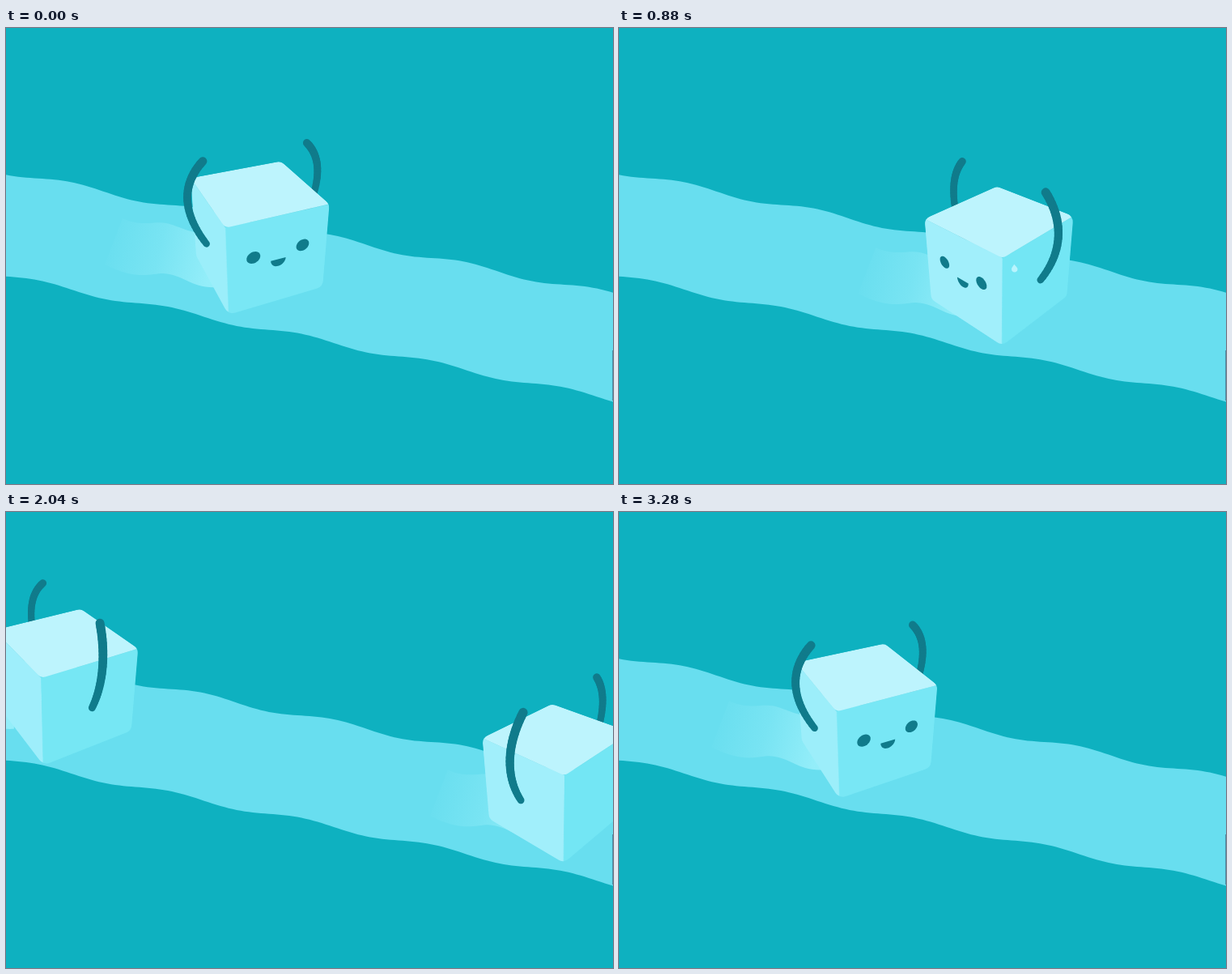
An HTML page with a canvas for the animation above (3.32 s loop, 750x563 px).

```html
<!DOCTYPE html>
<html lang="en">
<head>
<meta charset="utf-8">
<title>Ice cube ride</title>
<style>
  html, body { margin: 0; width: 100%; height: 100%; overflow: hidden; background: #0eb1c0; }
  canvas { display: block; }
</style>
</head>
<body>
<canvas id="stage" width="750" height="563"></canvas>
<script>
const ctx = document.getElementById('stage').getContext('2d');
const LOOP = 3320, STEP = 40, RAD = Math.PI / 180;
const DIST = 600, SIN = 0.474, COS = 0.8805;
const RADIUS = 92, HEIGHT = 123.5, HALF = 65;
const BG = '#0eb1c0', RIVER = '#68deef', INK = '#107b8b', TOP = '#bdf4fd';

const clamp = (v, a = 0, b = 1) => Math.min(b, Math.max(a, v));

// Perspective view from above; z points at the viewer, y up.
function project(c, x, y, z) {
  const k = 1 / (1 - (z * COS + y * SIN) / DIST);
  return { x: c.x + x * k, y: c.y + (z * SIN - y * COS) * k, k };
}

// A point "out" along a direction and "side" to its right.
function polar(c, angle, out, side, y) {
  const s = Math.sin(angle * RAD), o = Math.cos(angle * RAD);
  return project(c, out * s + side * o, y, out * o - side * s);
}

function tracePoly(pts) {
  ctx.beginPath();
  pts.forEach(p => ctx.lineTo(p.x, p.y));
  ctx.closePath();
}

function traceRounded(pts, radius) {
  const n = pts.length, last = pts[n - 1];
  ctx.beginPath();
  ctx.moveTo((last.x + pts[0].x) / 2, (last.y + pts[0].y) / 2);
  pts.forEach((p, i) => {
    const q = pts[(i + 1) % n];
    ctx.arcTo(p.x, p.y, (p.x + q.x) / 2, (p.y + q.y) / 2, radius(p));
  });
  ctx.closePath();
}

const cross = (a, b, c) => (b.x - a.x) * (c.y - a.y) - (b.y - a.y) * (c.x - a.x);

function hull(points) {
  const sorted = [...points].sort((a, b) => a.x - b.x || a.y - b.y);
  const chain = list => {
    const out = [];
    for (const p of list) {
      while (out.length > 1 && cross(out[out.length - 2], out[out.length - 1], p) <= 0) out.pop();
      out.push(p);
    }
    return out.slice(0, -1);
  };
  return [...chain(sorted), ...chain(sorted.reverse())];
}

// Sides are lightest facing front-left and darkest facing front-right.
function shade(angle) {
  const w = (1 + Math.sin(2 * angle * RAD)) / 2;
  const mix = (a, b) => Math.round(a + (b - a) * w);
  return `rgb(${mix(161, 115)},${mix(239, 230)},${mix(251, 244)})`;
}

function drawRiver() {
  const wave = 2 * Math.PI / 162;
  const upper = x => 177.6 + 0.2022 * x + 3.6 * Math.cos(wave * x);
  const lower = x => 306.6 + 0.2035 * x + 3.3 * Math.cos(wave * (x - 122));
  ctx.beginPath();
  for (let x = 0; x <= 750; x += 5) ctx.lineTo(x, upper(x));
  for (let x = 750; x >= 0; x -= 5) ctx.lineTo(x, lower(x));
  ctx.fillStyle = RIVER;
  ctx.fill();
  ctx.fillStyle = '#4a93ac';
  ctx.fillRect(749, 398, 1, 62);
}

function drawWake(t) {
  ctx.save();
  ctx.translate(0.197 * t, 0.0408 * t);
  const g = ctx.createLinearGradient(122, 264, 254, 296);
  g.addColorStop(0, 'rgba(160,242,252,0)');
  g.addColorStop(0.5, 'rgba(160,242,252,.29)');
  g.addColorStop(1, 'rgba(160,242,252,.78)');
  ctx.fillStyle = g;
  ctx.beginPath();
  ctx.moveTo(144, 235);
  ctx.bezierCurveTo(166, 246, 184, 238, 198, 241);
  ctx.bezierCurveTo(216, 245, 228, 255, 262, 256);
  ctx.lineTo(262, 320);
  ctx.bezierCurveTo(228, 322, 222, 305, 194, 303);
  ctx.bezierCurveTo(178, 303, 162, 312, 122, 292);
  ctx.fill();
  ctx.restore();
}

function drawArm(c, angle, side, t) {
  // Quadratic arc in space: shoulder, elbow, hand; the hand drifts backward.
  const bez = (s, a, b, d) => (1 - s) ** 2 * a + 2 * s * (1 - s) * b + s * s * d;
  const handFwd = 1.2 - 0.0047 * t, handY = 52.5 + 0.0027 * t;
  const at = s => {
    const y = bez(s, -61, 11, handY);
    const p = polar(c, angle, bez(s, 68, 107, 67), side * bez(s, 0, -6, handFwd), y);
    p.w = (9.1 + 0.012 * y) * p.k;
    return p;
  };
  ctx.strokeStyle = INK;
  ctx.lineCap = 'round';
  let a = at(0);
  for (let i = 1; i <= 24; i++) {
    const b = at(i / 24);
    ctx.lineWidth = b.w;
    ctx.beginPath();
    ctx.moveTo(a.x, a.y);
    ctx.lineTo(b.x, b.y);
    ctx.stroke();
    a = b;
  }
}

function drawFace(c, theta, t) {
  const spot = (u, y) => polar(c, theta, HALF, u, y);
  const open = clamp(Math.abs(t - 560) / 120, 0.11, 1);
  ctx.fillStyle = INK;
  for (const u of [-32, 32]) {
    const eye = [];
    for (let a = 0; a < 360; a += 12) {
      eye.push(spot(u + 8.6 * Math.cos(a * RAD), -49 + 8.2 * open * Math.sin(a * RAD)));
    }
    tracePoly(eye);
    ctx.fill();
  }
  const mouth = [];
  for (let a = 0; a <= 180; a += 10) {
    mouth.push(spot(9.8 * Math.cos(a * RAD), -60.5 - 10 * Math.sin(a * RAD)));
  }
  tracePoly(mouth);
  ctx.fill();
}

function drawDrop(c, theta, t) {
  if (t < 800 || t > 1560) return;
  const p = (t - 800) / 600;
  const size = Math.min(clamp(0.3 + (t - 800) / 400), clamp((1560 - t) / 140));
  const at = polar(c, theta + 90, HALF, -45, -18 - 106 * Math.min(p, 1) ** 1.5);
  ctx.save();
  ctx.translate(at.x, at.y);
  ctx.scale(size, size);
  ctx.fillStyle = p < 0.5 ? '#b9f4fd' : '#a5f1fc';
  ctx.beginPath();
  ctx.moveTo(-1, -10);
  ctx.bezierCurveTo(2, -6, 7.5, -2, 7.5, 2);
  ctx.bezierCurveTo(7.5, 12, -7.5, 12, -7.5, 2);
  ctx.bezierCurveTo(-7.5, -2, -3, -6, -1, -10);
  ctx.fill();
  ctx.restore();
}

function drawCube(t) {
  const early = Math.max(0, -560 - t);
  const c = {
    x: 309.6 + 0.1822 * t - 1e-5 * early * early,
    y: 202.5 + 0.0357 * t - 2 * Math.exp(-((t / 400) ** 2))
  };
  if (c.x < -130 || c.x > 960) return;
  const theta = 23.4 - 0.0753 * t;
  const corners = y => [-45, 45, 135, 225].map(a => polar(c, theta + a, RADIUS, 0, y));
  const top = corners(0), base = corners(-HEIGHT);
  const outline = hull([...top, ...base]);
  const arms = [-1, 1].map(side => ({ side, angle: theta + 90 * side }));
  const near = arm => Math.cos(arm.angle * RAD) > 0;
  const paintArm = arm => drawArm(c, arm.angle, -arm.side, t);

  drawWake(t);
  arms.filter(a => !near(a)).forEach(paintArm);

  ctx.save();
  traceRounded(outline, () => 11);
  ctx.clip();
  for (let i = 0; i < 4; i++) {
    const j = (i + 1) % 4;
    const side = [top[i], top[j], base[j], base[i]];
    if (cross(side[0], side[1], side[2]) <= 0) continue;
    tracePoly(side);
    ctx.fillStyle = ctx.strokeStyle = shade(theta + 90 * i);
    ctx.lineWidth = 0.6;
    ctx.fill();
    ctx.stroke();
    if (i === 0) drawFace(c, theta, t);
  }
  // Outer corners are already rounded by the clip.
  traceRounded(top, p => outline.includes(p) ? 1 : 9);
  ctx.fillStyle = TOP;
  ctx.fill();
  ctx.restore();

  drawDrop(c, theta, t);
  arms.filter(near).forEach(paintArm);
}

function render() {
  const t = Math.floor((performance.now() % LOOP) / STEP) * STEP;
  ctx.fillStyle = BG;
  ctx.fillRect(0, 0, 750, 563);
  drawRiver();
  drawCube(t);
  drawCube(t - LOOP);
  requestAnimationFrame(render);
}
render();
</script>
</body>
</html>
```
